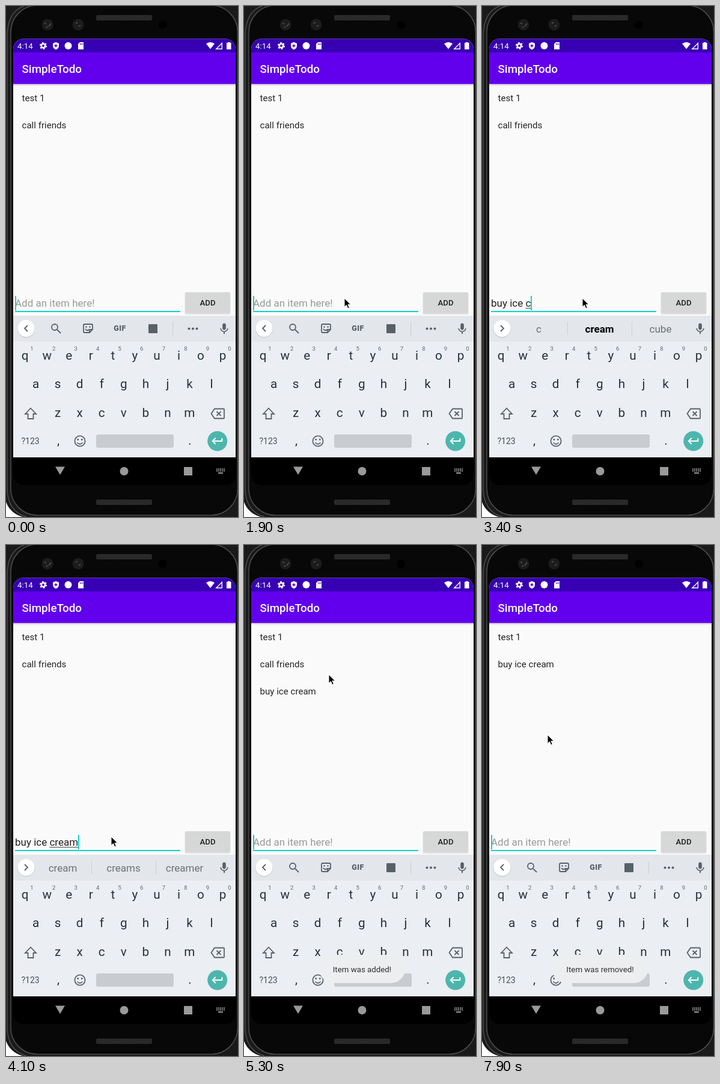
An HTML page that plays this animation: 386x848 px, repeating every 8000 ms.

```html
<!DOCTYPE html>
<html lang="en">
<head>
<meta charset="utf-8">
<title>Todo app</title>
<style>
  html, body { margin: 0; width: 100%; height: 100%; overflow: hidden; background: #fff; }
  svg { display: block; width: 386px; height: 848px; }
  text { font-family: Roboto, Arial, sans-serif; white-space: pre; }
  .mid { text-anchor: middle; }
  .item { font-size: 15.1px; fill: #242424; }
  .field { font-size: 17px; }
  .key { font-size: 20.7px; fill: #263238; }
  .digit { font-size: 9.5px; fill: #5f6b72; }
  .toast { font-size: 13.3px; fill: #303030; }
  .line { fill: none; stroke: #596167; stroke-width: 1.8; }
</style>
</head>
<body>
<svg viewBox="0 0 386 848">
  <defs>
    <linearGradient id="shade" x2="0" y2="1">
      <stop stop-color="#000" stop-opacity=".16"/><stop offset="1" stop-color="#000" stop-opacity="0"/>
    </linearGradient>
    <pattern id="mesh" width="4" height="4" patternUnits="userSpaceOnUse">
      <rect width="4" height="4" fill="#2e2e2e"/><path d="M0 4L4 0" stroke="#1b1b1b"/>
    </pattern>
    <clipPath id="screen"><rect x="12" y="54.5" width="370" height="740.5" rx="17"/></clipPath>
  </defs>

  <!-- phone body -->
  <path d="M0 0H386V848H28Q7 842 0 823Z" fill="#1a1a1a"/>
  <path d="M36 -2Q2 6 2 50V800Q2 838 34 848" fill="none" stroke="#4c4c4c" stroke-width="1.500"/>
  <rect x="8" y="-1" width="377.500" height="846" rx="44" fill="#080808" stroke="#4c4c4c" stroke-width="1.500"/>
  <rect x="150" y="15" width="93" height="9" rx="2" fill="url(#mesh)"/>
  <rect x="150" y="819" width="93" height="9" rx="2" fill="url(#mesh)"/>
  <g fill="#1c1c1c">
    <circle cx="69" cy="31" r="9.500"/><circle cx="120" cy="31" r="9.500"/>
    <circle cx="261" cy="31" r="7" fill="#000"/>
  </g>
  <path d="M64 28l3 2M71 34l4-5M67 36l2-2M116 29l3-2M121 34l3-2" stroke="#4a4a4a" stroke-width="2"/>

  <g clip-path="url(#screen)">
    <path d="M12 54H382V749H12Z" fill="#fafafa"/>
    <path d="M12 749H382V795H12Z" fill="#000"/>
    <path d="M12 129.500H382V133.500H12Z" fill="url(#shade)"/>
    <path d="M12 77H382V129.500H12Z" fill="#6200ee"/>
    <path d="M12 54H382V77H12Z" fill="#3700b3"/>
  </g>

  <!-- status bar -->
  <g fill="#fff">
    <text x="19" y="71" font-size="13.300">4:14</text>
    <circle cx="62" cy="66" r="3.200" fill="none" stroke="#fff" stroke-width="2.600"/>
    <circle cx="62" cy="66" r="5.200" fill="none" stroke="#fff" stroke-width="1.800" stroke-dasharray="2.7 2.745"/>
    <path d="M83 60l5 2v4q0 4.500-5 6.500q-5-2-5-6.500v-4z"/>
    <path d="M83 63.500v5M80.500 66h5" stroke="#3700b3" stroke-width="1.500"/>
    <circle cx="103.500" cy="66" r="6"/>
    <path d="M123 60h6v12h-9v-9z"/>
    <path d="M123.500 62v2.500M125.500 62v2.500M127.500 62v2.500" stroke="#3700b3"/>
    <path d="M333 62.500q7-5 14 0l-7 9z"/>
    <path d="M359.300 61.800v9.500h-9.500z" fill="none" stroke="#fff" stroke-width="1.400"/>
    <path d="M367 61h2v-1h3.500v1h2v11h-7.500z"/>
    <text x="26.500" y="110.700" font-size="18.800" font-weight="500">SimpleTodo</text>
  </g>

  <!-- list and input -->
  <text class="item" x="26.500" y="158">test 1</text>
  <text class="item" x="26.500" y="203" id="friends">call friends</text>
  <text class="item" x="26.500" id="cream">buy ice cream</text>
  <path d="M15 507H290" stroke="#12d3cb" stroke-width="2"/>
  <text class="field" x="15" y="499" id="hint" fill="#999">Add an item here!</text>
  <text class="field" x="15" y="499" id="entry" fill="#212121"></text>
  <path id="compose" stroke="#444"/>
  <rect id="caret" y="481" width="2" height="24" fill="#12d3cb"/>
  <rect x="297.500" y="476" width="76" height="36" rx="2" fill="#000" fill-opacity=".1"/>
  <rect x="298" y="475" width="75" height="34.500" rx="2" id="button"/>
  <text class="mid" x="335.500" y="497" font-size="13.200" font-weight="500" fill="#212121">ADD</text>

  <!-- keyboard -->
  <path d="M12 514H382V749H12Z" fill="#ebeef2"/>
  <path d="M12 514H382V557H12Z" fill="#e3e6ea"/>
  <circle cx="33.500" cy="536" r="14.500" fill="#000" fill-opacity=".1"/>
  <circle cx="33.500" cy="535" r="14" fill="#fff"/>
  <path class="line" id="chevron"/>
  <g id="tools" fill="#596167">
    <circle class="line" cx="81" cy="533" r="5"/><path class="line" d="M85 537l6 6"/>
    <path class="line" d="M131 528h11q2 0 2 2v7l-5 5h-8q-2 0-2-2v-10q0-2 2-2zM144 537h-5v5M132 536q3 4 6 1"/>
    <circle cx="133.500" cy="532.500" r="1.200"/><circle cx="139.500" cy="532.500" r="1.200"/>
    <text class="mid" x="189.500" y="539" font-size="12.500" font-weight="900" letter-spacing=".5">GIF</text>
    <rect x="237" y="528" width="15" height="15" rx="1"/>
    <path d="M277.500 525V546" stroke="#cbced2"/>
    <circle cx="304.500" cy="535.500" r="2"/><circle cx="311" cy="535.500" r="2"/><circle cx="317.500" cy="535.500" r="2"/>
  </g>
  <g id="words" class="mid" font-size="17">
    <path d="M142.500 524V546M249.500 524V546" stroke="#cbced2"/>
    <text x="94.500" y="542" fill="#6b7176"></text>
    <text x="195.500" y="542"></text>
    <text x="297" y="542" fill="#6b7176"></text>
  </g>
  <path transform="translate(351.700 524.500) scale(.942)" fill="#596167" d="M12 14c1.660 0 3-1.340 3-3V5c0-1.660-1.340-3-3-3S9 3.340 9 5v6c0 1.660 1.340 3 3 3zm5.300-3c0 3-2.540 5.100-5.300 5.100S6.700 14 6.700 11H5c0 3.410 2.720 6.230 6 6.720V21h2v-3.280c3.280-.480 6-3.300 6-6.720z"/>
  <g id="keys" class="mid"></g>
  <path class="line" d="M41 667.500l9 9.500h-4.500v8h-9v-8H32z"/>
  <path class="line" d="M347 668.500h15q1 0 1 1v14q0 1-1 1h-15l-5.500-8zM350.500 673l7 7M357.500 673l-7 7"/>
  <text x="25.500" y="727" font-size="14" fill="#455158">?123</text>
  <circle class="line" cx="123" cy="722" r="8.600"/>
  <path class="line" d="M118.500 724.500q4.500 5 9 0"/>
  <circle cx="119.700" cy="719.500" r="1.400" fill="#596167"/><circle cx="126.300" cy="719.500" r="1.400" fill="#596167"/>
  <rect x="150" y="711" width="129" height="22" rx="3" fill="#c8cbd0"/>
  <circle cx="351.700" cy="722" r="16.500" fill="#4db6ac"/>
  <path transform="translate(340.500 710.700) scale(.942)" fill="#fff" d="M19 7v4H5.830l3.580-3.590L8 6l-6 6 6 6 1.410-1.410L5.830 13H21V7z"/>

  <!-- navigation bar -->
  <g fill="#999">
    <path d="M82 764.500h16l-8 13.500z"/><circle cx="196.500" cy="772" r="7"/>
    <rect x="296" y="765" width="14" height="14"/>
    <path d="M350 768.500h14M350 771.500h14" stroke="#999" stroke-width="2" stroke-dasharray="2 1"/>
    <path d="M353 775h8" stroke="#999" stroke-width="2"/>
  </g>

  <!-- toasts -->
  <g id="removed" class="mid">
    <rect x="117" y="680" width="159" height="47" rx="23.500" fill="#edeef0"/>
    <text class="toast" x="196.500" y="709">Item was removed!</text>
  </g>
  <g id="added" class="mid">
    <rect x="125" y="680" width="143" height="47" rx="23.500" fill="#edeef0"/>
    <text class="toast" x="196.500" y="709">Item was added!</text>
  </g>

  <g id="mouse">
    <circle id="press" cy="1" r="20" fill="none" stroke="#000" stroke-width="3"/>
    <path d="M0 0v14.500l3.400-3.200l2.400 5.500l2.500-1.100l-2.400-5.300h4.600z" stroke="#fff" stroke-width="1"/>
  </g>
</svg>
<script>
const $ = id => document.getElementById(id);
const LOOP = 8000, STEP = 100, CLEAR = 4900;

// time, typed text, suggestions
const typing = [
  [2300, 'b', 'b but be'],
  [2400, 'bu', 'bu but bus'],
  [2500, 'buy', 'buy buying buyer'],
  [2700, 'buy ', 'a the it'],
  [3000, 'buy i', 'i in it'],
  [3100, 'buy ic', 'ic ice icon'],
  [3200, 'buy ice', 'ice iced ices'],
  [3300, 'buy ice ', 'cream cubes and'],
  [3400, 'buy ice c', 'c cream cube'],
  [3500, 'buy ice cr', 'cr cream crab'],
  [3600, 'buy ice cre', 'cre cream create'],
  [3700, 'buy ice crea', 'crea cream create'],
  [3800, 'buy ice cream', 'cream creams creamer']
];

// time, x, y
const path = [
  [1000, 300, 690], [1100, 189, 573], [1800, 189, 573], [1900, 167, 485],
  [3900, 167, 485], [4100, 175, 484], [4600, 332, 490], [4900, 332, 490],
  [5300, 141, 215], [5700, 118, 208], [6200, 79, 194], [7600, 79, 194], [7900, 109, 315]
];

const ramp = (t, a, b) => Math.min(1, Math.max(0, (t - a) / (b - a)));
const ease = p => (1 - Math.cos(Math.PI * p)) / 2;
const between = (t, a, b) => t >= a && t < b;
const show = (id, on) => $(id).setAttribute('opacity', +on);

function mouseAt(t) {
  const i = path.findIndex(p => p[0] >= t);
  if (i < 1) return path[i < 0 ? path.length - 1 : 0].slice(1);
  const [a, b] = [path[i - 1], path[i]], p = ramp(t, a[0], b[0]);
  return [1, 2].map(k => a[k] + (b[k] - a[k]) * p);
}

function buildKeys() {
  const label = (cls, x, y, s) => `<text class="${cls}" x="${x}" y="${y}">${s}</text>`;
  const row = (s, x, y, cls = 'key') => [...s].map((c, i) => label(cls, x + i * 36.55, y, c)).join('');
  $('keys').innerHTML = row('qwertyuiop', 31.6, 587) + row('1234567890', 43, 572, 'digit') +
    row('asdfghjkl', 49.6, 634) + row('zxcvbnm', 86.1, 682) +
    label('key', 87, 728, ',') + label('key', 306, 728, '.');
}

function drawInput(t) {
  const entry = $('entry');
  const typed = t < CLEAR && typing.findLast(k => k[0] <= t);
  const [since, text, hints] = typed || [t < CLEAR ? -100 : CLEAR, '', ''];
  entry.textContent = text;
  const end = 15 + (text && entry.getComputedTextLength());
  show('hint', !text);
  show('tools', !text);
  show('words', !!text);
  $('chevron').setAttribute('d', text ? 'M31 530l5 5l-5 5' : 'M36 530l-5 5l5 5');

  const start = text.lastIndexOf(' ') + 1;
  const left = 15 + (start && entry.getSubStringLength(0, start));
  $('compose').setAttribute('d', start < text.length ? `M${left} 501.5H${end}` : '');
  $('caret').setAttribute('x', Math.round(end));
  show('caret', Math.floor((t - since) / 500) % 2 === 0);

  const slots = $('words').querySelectorAll('text'), words = hints.split(' ');
  slots.forEach((slot, i) => slot.textContent = words[i] || '');
  const whole = text.endsWith('cream') || text.endsWith(' ');
  slots[1].setAttribute('font-weight', whole ? 400 : 700);
  slots[1].setAttribute('fill', whole ? '#6b7176' : '#000');
}

function draw(t) {
  drawInput(t);
  $('button').setAttribute('fill', between(t, 4700, 5100) ? '#c4c5c5' : '#d6d7d7');

  show('friends', 1 - ramp(t, 6850, 6970));
  show('cream', ramp(t, 4850, 4980));
  $('cream').setAttribute('y', 248 - 45 * ease(ramp(t, 6980, 7230)));

  show('added', ramp(t, 4850, 5150) * (1 - ramp(t, 6900, 7250)));
  show('removed', ramp(t, 6850, 7000));

  show('mouse', t >= path[0][0]);
  $('mouse').setAttribute('transform', `translate(${mouseAt(t)})`);
  show('press', between(t, 4700, 4900) || between(t, 6400, 7700));
}

function tick(now) {
  draw(Math.floor(now % LOOP / STEP) * STEP);
  requestAnimationFrame(tick);
}

buildKeys();
draw(0);
requestAnimationFrame(tick);
</script>
</body>
</html>
```
